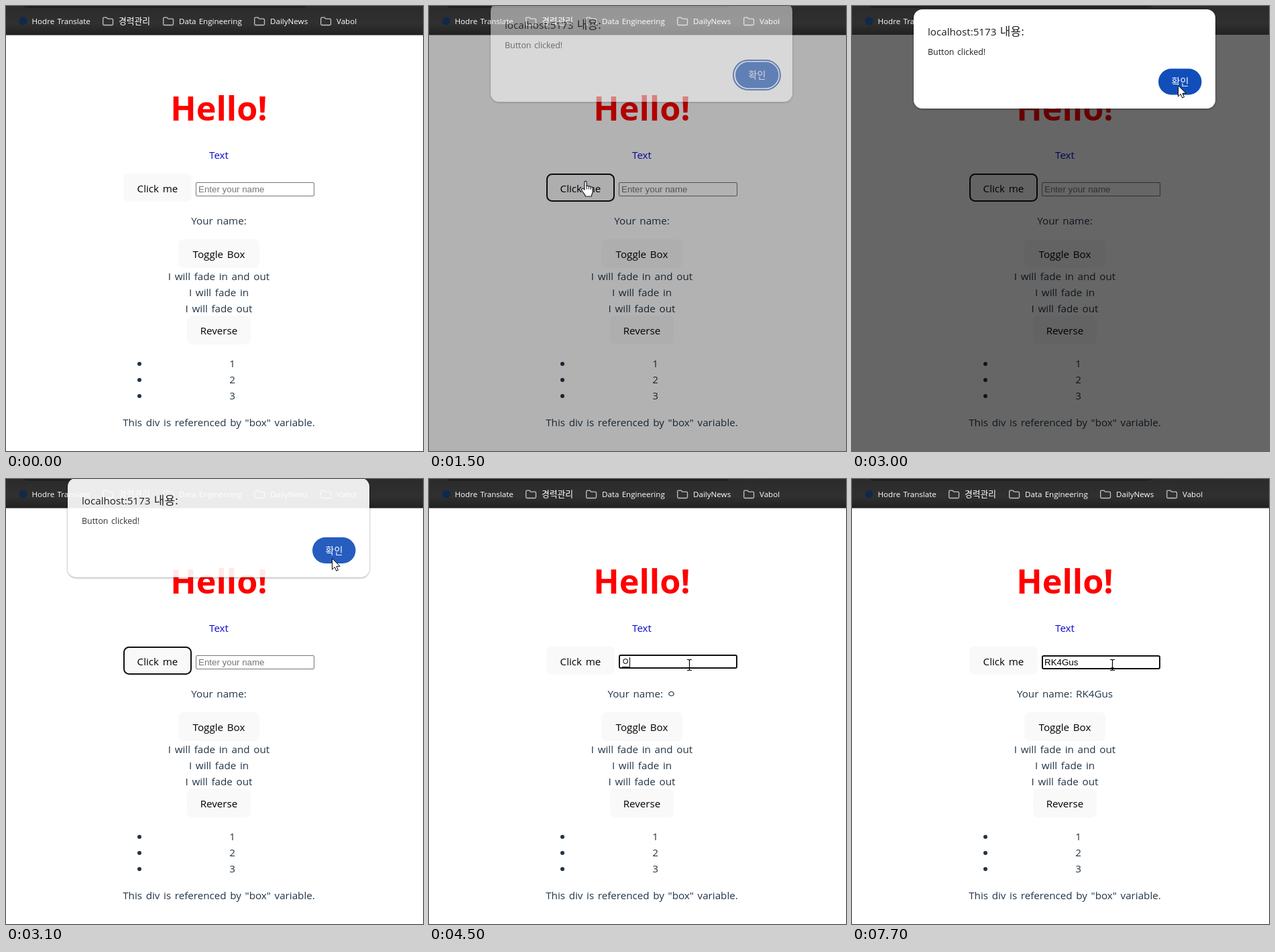
These frames come from a looping animation (622 px wide and 664 px high, 8 s). An HTML page:

```html
<!DOCTYPE html>
<html lang="en">
<head>
<meta charset="utf-8">
<title>Event demo</title>
<style>
html, body { margin: 0; width: 100%; height: 100%; overflow: hidden; background: #fff; }
svg { display: block; width: 622px; height: 664px; }
text { font-family: "Open Sans", "Noto Sans CJK KR", "Noto Sans CJK", sans-serif; white-space: pre; }
.body { font-size: 15.2px; word-spacing: 1.7px; fill: #213547; text-anchor: middle; }
.label { fill: #000; }
.mark { font-size: 11.6px; word-spacing: 1.2px; fill: #fff; }
.field { font: 13.333px "Liberation Sans", "Noto Sans CJK KR", sans-serif; }
</style>
</head>
<body>
<svg id="stage" viewBox="0 0 622 664">
  <defs>
    <linearGradient id="barFill" x2="0" y2="1">
      <stop offset="0" stop-color="#2b2b2b"/>
      <stop offset=".6" stop-color="#303030"/>
      <stop offset="1" stop-color="#212121"/>
    </linearGradient>
    <filter id="shadow" x="-5%" y="-10%" width="110%" height="125%">
      <feDropShadow dx="0" dy="1" stdDeviation="1.5" flood-opacity=".45"/>
    </filter>
  </defs>
  <rect width="622" height="664" fill="#fff"/>
  <g id="page"></g>
  <rect id="dim" y="43.5" width="622" height="620.5" opacity=".6"/>
  <g id="bar">
    <rect width="622" height="43.5" fill="url(#barFill)"/>
    <path d="M26 0H448Q446 2.5 440 2.5H34Q28 2.5 26 0Z" fill="#1d1d1f"/>
    <circle cx="25.5" cy="22.5" r="6" fill="#10294a"/>
  </g>
  <g id="dialog">
    <rect x="92" y="5" width="450" height="148" rx="13" fill="#fff" filter="url(#shadow)"/>
    <text x="113" y="44" font-size="15.2" fill="#1f1f1f" style="word-spacing:1.5px">localhost:5173 <tspan font-size="17">내용:</tspan></text>
    <text x="113" y="73" font-size="12.4" fill="#1f1f1f" style="word-spacing:1.2px">Button clicked!</text>
    <rect id="ring" x="454" y="91" width="70" height="44" rx="22" fill="#fff" stroke="#114eb9" stroke-width="2"/>
    <rect x="457" y="93.5" width="64.5" height="39" rx="19.5" fill="#114eb9"/>
    <text x="489.5" y="118" font-size="14" fill="#fff" text-anchor="middle">확인</text>
  </g>
  <g id="arrow">
    <path d="M0 0V16.5L3.8 12.9L6.3 18.6L9 17.4L6.5 11.8H11.6Z" fill="#fff" stroke="#000"/>
  </g>
  <g id="hand">
    <path d="M-1.6 12.5V1.6C-1.6 -.6 1.6 -.6 1.6 1.6V7.6C1.8 6.2 4.6 6.3 4.7 8.2C5.2 6.9 7.6 7.2 7.7 9C8.4 7.9 10.6 8.4 10.6 10.4V15.5C10.6 18 9 19.4 8.8 22.5H0C-.6 19.5 -3 18 -5.6 13.8C-6.9 11.6 -4.4 10 -2.8 11.4Z" fill="#fff" stroke="#1a1a2a" stroke-width="1.2"/>
    <path d="M1.6 7V12M4.7 8.5V12M7.7 9.5V12.5" fill="none" stroke="#1a1a2a"/>
  </g>
  <g id="beam">
    <path d="M-3.5 -8H-1L0 -7L1 -8H3.5M0 -7V7M-3.5 8H-1L0 7L1 8H3.5M-2 4H2" fill="none" stroke="#000" stroke-width="1.2"/>
  </g>
</svg>
<script>
const LOOP = 8000, STEP = 100, MID = 317.5;
const $ = id => document.getElementById(id);

function add(parent, tag, attrs, text) {
  const el = document.createElementNS("http://www.w3.org/2000/svg", tag);
  for (const k in attrs) el.setAttribute(k, attrs[k]);
  if (text) el.textContent = text;
  return parent.appendChild(el);
}
function set(el, attrs) { for (const k in attrs) el.setAttribute(k, attrs[k]); }
function show(el, on) { el.style.display = on ? "" : "none"; }

const page = $("page"), bar = $("bar");
const line = (y, s, x = MID) => add(page, "text", { class: "body", x, y }, s);
function button(x, y, w, h, s) {
  const box = add(page, "rect", { x, y, width: w, height: h, rx: 8, fill: "#f9f9f9" });
  add(page, "text", { class: "body label", x: x + w / 2, y: y + 28 }, s);
  return box;
}

add(page, "text", { x: MID, y: 171, "text-anchor": "middle", "font-size": 50.3, "font-weight": 700, fill: "#f00" }, "Hello!");
line(228, "Text").style.fill = "#0a0ad2";
const clickBox = button(175, 250, 102, 42, "Click me");
const input = add(page, "rect", {});
const typed = add(page, "text", { class: "field", x: 287 });
const under = add(page, "path", { stroke: "#000" });
const caret = add(page, "path", { stroke: "#000" });
const nameLine = line(326, "Your name:");
button(257, 348, 121, 43, "Toggle Box");
line(409, "I will fade in and out");
line(433, "I will fade in");
line(457, "I will fade out");
button(270, 462, 95, 43, "Reverse");
[1, 2, 3].forEach((n, i) => {
  add(page, "circle", { cx: 199, cy: 534 + 24 * i, r: 3, fill: "#213547" });
  line(539 + 24 * i, String(n), 337.5);
});
line(627, 'This div is referenced by "box" variable.');

add(bar, "text", { class: "mark", x: 38.5, y: 27 }, "Hodre Translate");
[[144, "경력관리"], [234, "Data Engineering"], [370, "DailyNews"], [469, "Vabol"]].forEach(([x, s], i) => {
  add(bar, "path", {
    d: `M${x + 2} 17.2H${x + 6}L${x + 8} 19.2H${x + 14}Q${x + 15.5} 19.2 ${x + 15.5} 20.7V27Q${x + 15.5} 28.5 ${x + 14} 28.5H${x + 2}Q${x + .7} 28.5 ${x + .7} 27V18.7Q${x + .7} 17.2 ${x + 2} 17.2Z`,
    fill: "none", stroke: "#c4c4c4", "stroke-width": 1.3
  });
  const label = add(bar, "text", { class: "mark", x: x + 24, y: 27 }, s);
  if (!i) label.style.fontSize = "12.8px";
});

// time, tip x, tip y
const route = [
  [800, 420, 440], [1200, 233, 261], [1900, 233, 261],
  [2600, 486, 118], [3100, 486, 118], [3500, 388, 277], [LOOP, 388, 277]
];
function pointer(t) {
  const i = route.findIndex(p => p[0] > t);
  const a = route[i - 1], b = route[i];
  const u = (t - a[0]) / (b[0] - a[0]), e = u * u * (3 - 2 * u);
  return [a[1] + (b[1] - a[1]) * e, a[2] + (b[2] - a[2]) * e];
}

// time of each keystroke and the field value after it
const keys = [
  [3600, ""], [4500, "ㅇ"], [5200, ""], [5700, "R"], [5800, "RK"],
  [6400, "RK4"], [7000, "RK4G"], [7100, "RK4Gu"], [7200, "RK4Gus"]
];

function drawField(t) {
  const key = keys.filter(k => k[0] <= t).pop();
  const focus = !!key, value = focus ? key[1] : "", hangul = value === "ㅇ";
  const lift = hangul ? 1 : 0;
  set(input, focus
    ? { x: 284, y: 264 - lift, width: 175, height: 19, rx: 2, fill: "#fff", stroke: "#101010", "stroke-width": 2 }
    : { x: 283.5, y: 263.5, width: 176, height: 20, rx: 1.5, fill: "#fff", stroke: "#767676", "stroke-width": 1 });
  typed.textContent = value || "Enter your name";
  set(typed, { y: 278 - lift, fill: value ? "#000" : "#757575" });
  const w = value ? typed.getComputedTextLength() : 0;
  const x = Math.floor(287 + w) + .5;
  set(caret, { d: `M${x} 266V281` });
  show(caret, focus && (t - key[0]) % 1000 < 500);
  set(under, { d: `M288 280.5H${x - 1}` });
  show(under, hangul);
  nameLine.textContent = value ? "Your name: " + value : "Your name:";
}

// the dialog drops in over two steps, then lifts away while it fades
function drawDialog(t) {
  const opening = t < 1500 ? 0 : t < 1600 ? .5 : 1;
  const closing = Math.max(0, (t - 3000) / 100);
  const alpha = Math.max(0, opening - .09 * closing ** 2.7);
  const rise = (1 - opening) * 20 + 6.5 * closing;
  set($("dialog"), { opacity: alpha, transform: `translate(0 ${-rise})` });
  show($("dialog"), alpha > 0);
  show($("ring"), t < 3000);
  show($("dim"), opening > 0 && t < 3100);
  set($("dim"), { opacity: .6 * opening });
}

function drawPointer(t) {
  const on = t >= route[0][0];
  const [x, y] = on ? pointer(t) : [0, 0];
  const inside = (l, top, r, b) => x >= l && x <= r && y >= top && y <= b;
  const kind = inside(175, 250, 277, 292) || inside(257, 348, 378, 391) ? "hand"
    : inside(283, 263, 460, 284) ? "beam" : "arrow";
  for (const id of ["arrow", "hand", "beam"]) {
    show($(id), on && id === kind);
    set($(id), { transform: `translate(${Math.round(x) + .5} ${Math.round(y) + .5})` });
  }
}

function draw(ms) {
  const t = Math.floor((ms % LOOP) / STEP) * STEP;
  const pressed = t >= 1300 && t < 3600;
  set(clickBox, pressed
    ? { x: 176, y: 251, width: 100, height: 40, rx: 7.5, stroke: "#101010", "stroke-width": 2 }
    : { x: 175, y: 250, width: 102, height: 42, rx: 8, stroke: "none" });
  drawField(t);
  drawDialog(t);
  drawPointer(t);
}

const start = performance.now();
function tick(now) {
  draw(Math.max(0, now - start));
  requestAnimationFrame(tick);
}
draw(0);
requestAnimationFrame(tick);
</script>
</body>
</html>
```
